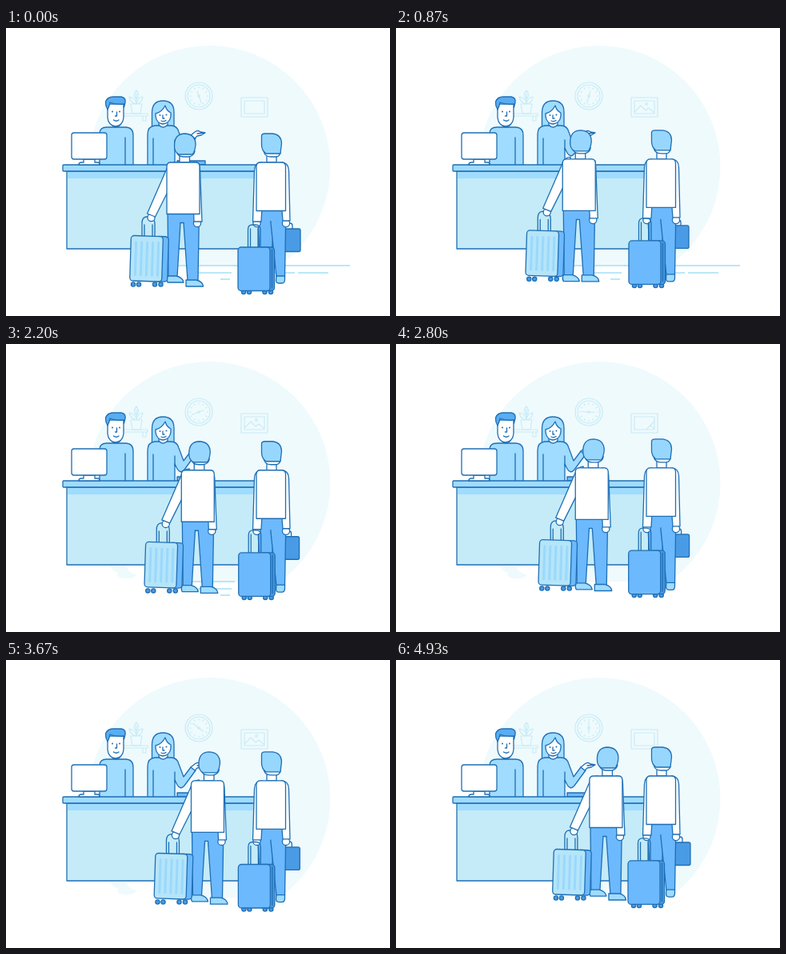
Animation of 480 by 360 pixels, one loop 5000 ms. Source, as an HTML page:

```html
<!DOCTYPE html>
<html lang="en">
<head>
<meta charset="utf-8">
<title>Reception desk</title>
<style>
  html, body { margin: 0; width: 100%; height: 100%; overflow: hidden; background: #fff; }
  svg { display: block; width: 100vw; height: 100vh; }
  .ink { stroke: #1f6fb5; stroke-width: 1.3; stroke-linejoin: round; stroke-linecap: round; fill: none; }
  .faint { stroke: #c8ecf5; stroke-width: 1.2; stroke-linejoin: round; stroke-linecap: round; fill: none; }
  .floor { stroke: #a5e0f3; stroke-width: 1.3; fill: none; }
  .white { fill: #fff; }
  .pale { fill: #c4ebf7; }
  .sky { fill: #9fdcff; }
  .blue { fill: #6db9fd; }
  .deep { fill: #4a9be5; }
  .hair { fill: #98d7fd; }
  .wall { fill: #effafd; }
  .dot { fill: #1f6fb5; stroke: none; }
</style>
</head>
<body>
<svg viewBox="0 0 480 360">
  <defs>
    <clipPath id="room"><path d="M0 0H480V297H200V276H0Z"/></clipPath>
    <clipPath id="pane"><rect x="298" y="91" width="25" height="16"/></clipPath>
  </defs>

  <circle class="wall" cx="254" cy="173.500" r="151.500" clip-path="url(#room)"/>
  <path id="patch" class="wall" d="M130 277H150Q152 286 163 288Q162 294 148 293Q137 292 140 286Q133 284 130 277Z"/>

  <g class="faint">
    <circle cx="241" cy="85" r="17"/>
    <circle cx="241" cy="85" r="14"/>
    <g id="ticks"></g>
    <path id="longHand" d="M241 85V76"/>
    <path id="shortHand" d="M241 85V78.500"/>
    <circle cx="241" cy="85" r="1.200"/>
    <rect x="294" y="87" width="33" height="24"/>
    <g clip-path="url(#pane)">
      <path d="M298 105l8-8 6 6 4-3 7 6"/><circle cx="313" cy="95" r="1.300"/>
      <path id="glare" class="wall" d="M-60 90H0L-17 108H-77Z"/>
    </g>
    <rect x="298" y="91" width="25" height="16"/>
    <path d="M147 107h30v3h-30zM171 110v6h4v-6"/>
    <path d="M156 95h14l-2 12h-10zM163 95V82M163 95q-7-1-9-9q8 1 9 9q1-8 8-9q-1 8-8 9M163 89q-5-5 0-11q5 6 0 11"/>
  </g>

  <g id="floorRight" class="floor">
    <path d="M285 297H430M320 306H361M365 306H403"/>
  </g>
  <g id="floorLeft" class="floor">
    <path d="M213 297H286M240 306H282M268 314H280"/>
  </g>

  <!-- clerk on the left -->
  <g class="ink">
    <path class="sky" d="M117 172V132Q117 124 126 124H149Q159 124 159 134V172Z"/>
    <path d="M149 137V172M124 140V132"/>
    <path class="white" d="M132 115V121Q137 127 143 121V115"/>
    <path class="white" d="M127 95V112Q128 122 137 123Q146 122 147 112V95Z"/>
    <path fill="#59adf2" d="M127 102Q124 97 124.500 92Q127 86 134 86H144Q150 87 149 93L147.500 99V95Q138 96 130 93Q129 98 127 102Z"/>
    <path d="M138.500 105v5h-2M134.500 115q3.500 2.500 6.500 0"/>
    <circle class="dot" cx="133" cy="104.500" r="1"/><circle class="dot" cx="142" cy="104.500" r="1"/>
  </g>

  <!-- clerk on the right -->
  <g class="ink">
    <path class="sky" d="M182.500 123V105Q183 91 196 91Q210 91 210 105V123Z"/>
    <path class="sky" d="M177 172V133Q177 123 186 122H206Q214 122 216 130L222 146L231 134L237 138L223 157Q218 163 214 156L211 150V172Z"/>
    <path d="M184 138V172M211 140V152"/>
    <path class="white" d="M231 134L236 130Q240 127 243 130L249 131L244 134L239 135L236 138Z"/>
    <path d="M239 132l9-1"/>
    <path class="white" d="M191 114V121Q196 127 202 121V114"/>
    <path class="white" d="M187 107Q195 105 199 97Q201 104 206 106V110Q205 119 196 120Q188 119 187 110Z"/>
    <path d="M196 109v4h2M194 116q3 1.500 6-.5"/>
    <circle class="dot" cx="192.500" cy="109" r="1"/><circle class="dot" cx="200.500" cy="108.500" r="1"/>
  </g>

  <!-- counter and monitor -->
  <g class="ink">
    <rect class="pale" x="76" y="179" width="240" height="97"/>
    <path class="sky" d="M77 180H315V188H77Z" stroke="none"/>
    <rect class="blue" x="214" y="166" width="35" height="5"/>
    <rect class="sky" x="71" y="171" width="250" height="8" rx="1"/>
    <path class="white" d="M97 164H111V168H115Q117 168 117 171H91Q91 168 94 168H97Z"/>
    <rect class="white" x="82" y="131" width="44" height="33" rx="3"/>
  </g>

  <!-- traveller on the right -->
  <g class="ink">
    <g id="bag">
      <path d="M345 251V247Q345 244 348 244H355Q358 244 358 247V251"/>
      <rect class="deep" x="332" y="251" width="36" height="28.500" rx="2"/>
    </g>
    <g id="rightLegs">
      <path class="blue" d="M314 222H336L331 302H318Z"/>
      <path class="blue" d="M330 222H350L348.500 311H338L331 244Z"/>
      <path class="blue" stroke="none" d="M316 222H348V241H316Z"/>
      <path class="sky" d="M338 310H348.500V315Q348 319 345 319H341Q337.500 319 337.500 315Z"/>
    </g>
    <g id="rightBody">
      <circle class="white" cx="313.500" cy="244" r="4.600"/>
      <circle class="white" cx="350" cy="244" r="4.600"/>
      <path class="white" d="M320 168Q311 168 310.500 178L308.500 242H319L322 190Z"/>
      <path class="white" d="M344 168Q353 168 353.500 178L355 241H346L342 190Z"/>
      <path class="white" d="M326 152V168H338V152Z"/>
      <path class="white" d="M322 153Q323 161 331 161H338Q343 160 343 154Z"/>
      <path class="white" d="M313 173Q313 168 318 168H344.500Q349.500 168 349.500 173V228.500H313Z"/>
      <path class="hair" d="M319.500 135Q319.500 132 324 132H333Q344 133 344.500 144L343 157H325Q319.500 153 319.500 146Z"/>
    </g>
    <g id="rightCase">
      <path d="M302.500 274V252Q302.500 246 308 246H312Q318 246 318 252V274M305.500 274V251M315 274V251"/>
      <g id="rightWheels"></g>
      <rect class="deep" x="317" y="274" width="18.500" height="54.500" rx="4"/>
      <path d="M332.500 277V325"/>
      <rect class="blue" x="290" y="274" width="40" height="54.500" rx="4"/>
    </g>
  </g>

  <!-- traveller on the left -->
  <g id="leftMan" class="ink">
    <g id="leftLeg">
      <path class="blue" d="M202 225H221L218 244L214 311H203Z"/>
      <path class="sky" d="M202 310H213Q221 312 222 318H202Q200 314 202 310Z"/>
    </g>
    <g id="rightLeg">
      <path class="blue" d="M219 225H241.500L240 316H227L222 244Z"/>
      <path class="sky" d="M225 315H238Q246 317 246.500 323H225Z"/>
    </g>
    <path class="blue" stroke="none" d="M203.500 226H240V243H203.500Z"/>
    <path d="M218 243.500H222"/>
    <circle class="white" cx="239" cy="244" r="4.600"/>
    <path class="white" d="M234 168Q242 168 242.500 177L245 242H235L233 190Z"/>
    <g id="leftCase">
      <path d="M170 261V244Q170 237 175 236H180Q186 238 186 245V261M173 261V246M183 261V246"/>
      <circle class="white" cx="181.500" cy="237" r="4.600"/>
      <path class="white" d="M211 168Q203 168 200 178L176.500 232L186.500 236L205 199Z"/>
      <g id="leftWheels"></g>
      <g transform="rotate(1.800 175 289)">
        <rect class="blue" x="186" y="260" width="16.500" height="56.500" rx="4"/>
        <rect fill="#b5e5f9" x="155.500" y="260" width="40" height="56.500" rx="4"/>
        <g id="stripes" stroke="#9bd8fc" stroke-width="3"></g>
      </g>
    </g>
    <path class="white" d="M217 152V168H229.500V152Z"/>
    <path class="white" d="M213 154Q215 161 222 161H228Q235 160 236 154Z"/>
    <path class="white" d="M201 173Q201 168 206 168H237Q242 168 242 173V232.500H201Z"/>
    <path class="hair" d="M210.500 148Q210 132 224 132Q237 133 237 146Q236 155 233 158H216Q210.500 155 210.500 148Z"/>
  </g>
</svg>

<script>
const LOOP = 5000, STEPS = 3;
const $ = id => document.getElementById(id);
const move = (id, x, y) => $(id).setAttribute('transform', `translate(${x} ${y})`);
const turn = (id, a) => $(id).setAttribute('transform', `rotate(${a} 241 85)`);
const show = (id, on) => $(id).setAttribute('visibility', on ? 'visible' : 'hidden');

const wheels = (id, y, xs) => {
  $(id).innerHTML = xs.map(x => `<circle class="deep" cx="${x}" cy="${y}" r="2.600"/>`).join('');
};
wheels('leftWheels', 320.5, [159, 166, 186, 193.5]);
wheels('rightWheels', 330, [297, 304, 323.5, 331]);

$('stripes').innerHTML = [162, 169, 176, 183, 190].map(x => `<path d="M${x} 268V309"/>`).join('');
$('ticks').innerHTML = Array.from({ length: 12 }, (_, i) =>
  `<path d="M241 73.500v1.500" transform="rotate(${i * 30} 241 85)"/>`).join('');

// Glare covers the picture late in each step and leaves early in the next.
function glareX(p) {
  if (p < 0.2) return 344 + p * 350;
  return 290 + Math.min(1, Math.max(0, (p - 0.5) / 0.25)) * 54;
}

function draw(t) {
  const p = t * STEPS % 1;
  const bob = 1 - Math.cos(2 * Math.PI * p);
  const rise = -23.3 * t;

  move('leftMan', 41.5 * t, rise);
  move('leftLeg', 0, 1.3 * bob);
  move('rightLeg', 0, -bob);
  move('leftCase', 0, -1.3 * bob);
  move('bag', -bob, rise);
  move('rightLegs', 0, rise + bob);
  move('rightBody', 0, rise);
  move('rightCase', 0.5 * bob, rise - 2 * bob);

  turn('longHand', 160 + 202 * t);
  turn('shortHand', -18 + 200 * t);
  move('glare', glareX(p), 0);

  show('patch', t > 0.2 && t < 0.87);
  show('floorRight', t < 0.34);
  show('floorLeft', t < 0.55);
}

function frame() {
  draw(performance.now() % LOOP / LOOP);
  requestAnimationFrame(frame);
}
frame();
</script>
</body>
</html>
```
